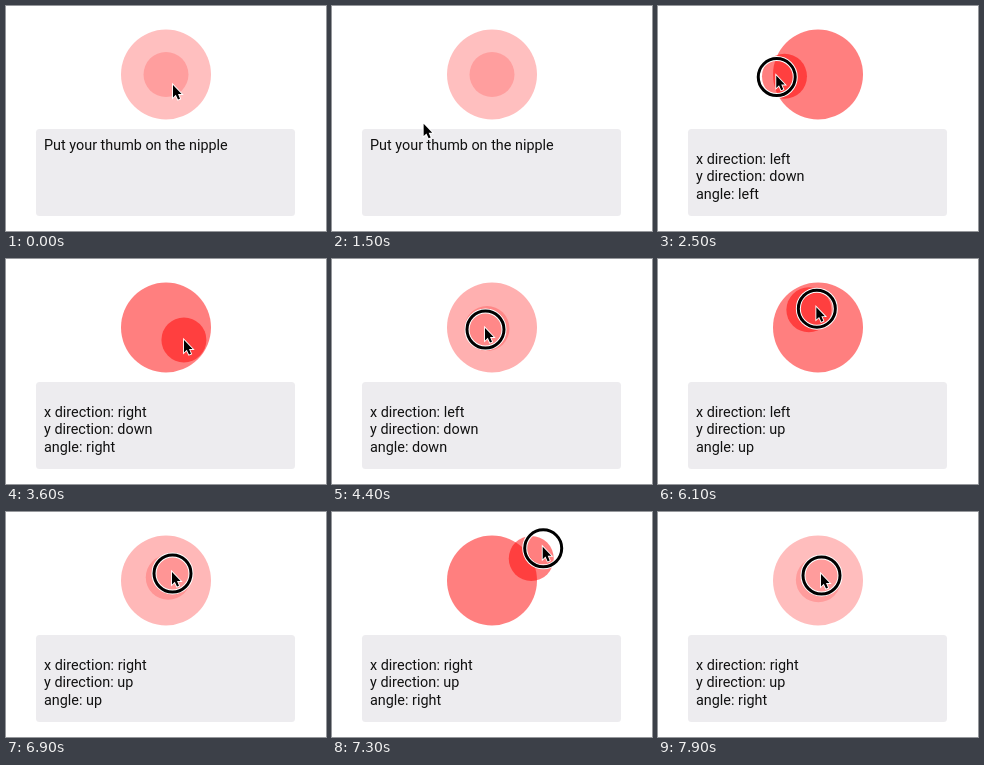
An HTML page that plays this animation: 320x225 px, repeating every 8 s.

```html
<!DOCTYPE html>
<html lang="en">
<head>
<meta charset="utf-8">
<title>Virtual joystick</title>
<style>
  html, body { margin: 0; width: 100%; height: 100%; overflow: hidden; background: #fff; }
  svg { display: block; width: 320px; height: 225px; }
  text { font: 14.4px Roboto, Arial, sans-serif; fill: #111; white-space: pre; }
</style>
</head>
<body>
<svg viewBox="0 0 320 225">
  <rect x="30" y="123" width="259" height="87" rx="3.5" fill="#edecef"/>
  <text id="hint" x="38" y="144">Put your thumb on the nipple</text>
  <g id="info">
    <text x="38" y="158"></text>
    <text x="38" y="175.3"></text>
    <text x="38" y="192.6"></text>
  </g>
  <g id="stick" fill="#f00">
    <circle cx="160" cy="68.5" r="45" opacity=".5"/>
    <circle id="thumb" cx="160" cy="68.5" r="22.5" opacity=".5"/>
  </g>
  <g id="cursor">
    <g id="ring" fill="none">
      <circle cx=".5" cy="1.5" r="18.5" stroke="#fff" stroke-width="5"/>
      <circle cx=".5" cy="1.5" r="18.5" stroke="#000" stroke-width="3"/>
    </g>
    <path d="M0 0V12.4L2.8 9.8L5 14.6L7 13.7L5 9H8.6Z" stroke="#fff" stroke-width="1.8" paint-order="stroke"/>
  </g>
</svg>
<script>
const LOOP = 8000, STEP = 100, FADE = 250, FOLLOW = 120, LAG = 35, MOVE = 350;
const HOME = [160, 68.5], REACH = 45, DEAD_ZONE = 8;

// Where the cursor tip arrives: time, x, y
const stops = [
  [0, 167, 79], [600, 156, 62], [1350, 74, 129], [1750, 163, 72],
  [2150, 192, 76], [2560, 112, 69], [3150, 195, 76], [3500, 178, 81],
  [3950, 160, 100], [4400, 153, 69], [5100, 195, 76], [5450, 174, 81],
  [5900, 125, 60], [6200, 170, 44], [6600, 166, 60], [7250, 212, 40],
  [7400, 207, 20], [7800, 163, 62]
];

// Button down, button up
const presses = [[1760, 3590], [4320, 5150], [5700, 6420], [6850, 7420], [7875, LOOP]];

const $ = id => document.getElementById(id);
const ease = v => { v = Math.max(0, Math.min(1, v)); return v * v * (3 - 2 * v); };
const isHeld = t => presses.some(([down, up]) => t >= down && t < up);

// The cursor rests at each stop, then leaves at most MOVE ms before the next arrival
function tipAt(t) {
  let [last, x, y] = stops[0];
  for (const [arrive, nx, ny] of stops.slice(1)) {
    const span = Math.min(MOVE, arrive - last);
    const k = ease((t - arrive + span) / span);
    x += (nx - x) * k;
    y += (ny - y) * k;
    last = arrive;
  }
  return [x, y];
}

function pullAt(t) {
  const [x, y] = tipAt(t - LAG);
  return [x - HOME[0], y - HOME[1]];
}

// The latest pull beyond the dead zone decides the words
function readingAt(t) {
  for (; t > 0; t -= 20) {
    if (!isHeld(t)) continue;
    const [dx, dy] = pullAt(t);
    if (Math.hypot(dx, dy) < DEAD_ZONE) continue;
    const h = dx < 0 ? "left" : "right", v = dy < 0 ? "up" : "down";
    return [h, v, Math.abs(dx) > Math.abs(dy) ? h : v];
  }
}

function draw(t) {
  let level = 0, ox = 0, oy = 0;
  for (const [down, up] of presses) {
    const back = ease((t - up) / FADE);
    level += ease((t - down) / FADE) - back;
    const [dx, dy] = pullAt(Math.min(t, up));
    const limit = Math.min(1, REACH / (Math.hypot(dx, dy) || 1));
    const k = limit * ease((t - down) / FOLLOW) * (1 - back);
    ox += dx * k;
    oy += dy * k;
  }
  $("stick").setAttribute("opacity", 0.5 + 0.5 * level);
  $("thumb").setAttribute("transform", `translate(${ox} ${oy})`);
  $("cursor").setAttribute("transform", `translate(${tipAt(t)})`);
  $("ring").style.display = isHeld(t) ? "" : "none";

  const words = readingAt(t);
  $("hint").style.display = words ? "none" : "";
  $("info").style.display = words ? "" : "none";
  if (words) {
    ["x direction", "y direction", "angle"].forEach((label, i) => {
      $("info").children[i].textContent = `${label}: ${words[i]}`;
    });
  }
}

const start = performance.now();
function tick() {
  const t = (performance.now() - start) % LOOP;
  draw(Math.floor(t / STEP) * STEP);
  requestAnimationFrame(tick);
}
tick();
</script>
</body>
</html>
```
